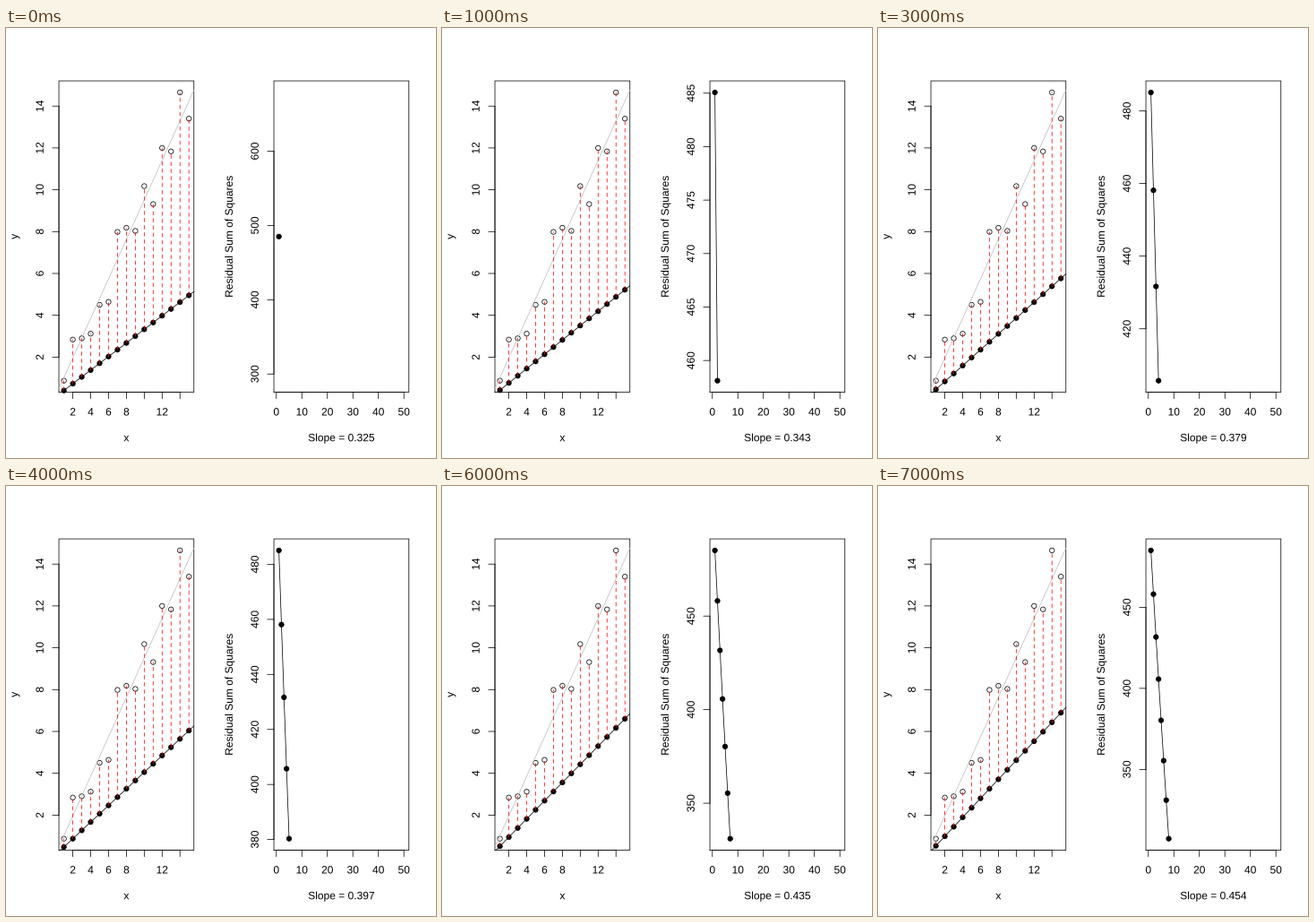
A matplotlib script for the animation above (8 s loop, 480 by 480 pixels).

```python
import math

import numpy as np
import matplotlib.pyplot as plt
from matplotlib.animation import FuncAnimation
from matplotlib.patches import Circle, PathPatch
from matplotlib.text import Text
from matplotlib.textpath import TextPath, text_to_path
from matplotlib.transforms import Affine2D

plt.rcParams.update({
    "font.family": "Liberation Sans",
    "font.size": 12,
    "lines.scale_dashes": False,
})

SIZE = 480
LINE = 14.4            # height of one margin line in pixels
TOP, BOTTOM = 4.1 * LINE, SIZE - 5.1 * LINE
THIN = 0.75
RADIUS = 2.7
STEPS = 50             # slopes in the full sweep
SHOWN = 8
FONT = Text().get_fontproperties()

x = np.arange(1, 16)
y = np.array([0.874, 2.84, 2.9, 3.12, 4.5, 4.642, 7.987, 8.184, 8.034,
              10.175, 9.315, 12.0, 11.835, 14.654, 13.4])
best, a = np.polyfit(x, y, 1)
slopes = np.tan(np.linspace(math.pi / 10, 3.5 * math.pi / 10, STEPS))
rss = [np.sum((y - a - b * x) ** 2) for b in slopes]
tick_steps = [100, 5, 10, 20, 20, 20, 50, 50]

fig = plt.figure(figsize=(SIZE / 72, SIZE / 72), dpi=72, facecolor="white")
ax = fig.add_axes([0, 0, 1, 1])


def stroke(xs, ys, color="black", **kw):
    ax.plot(xs, ys, color=color, lw=THIN, snap=False, zorder=1,
            solid_capstyle="round", **kw)


def label(px, py, text, angle=0):
    """Outlined text, so that it keeps its fractional position."""
    width = text_to_path.get_text_width_height_descent(text, FONT, False)[0]
    place = (Affine2D().translate(-width / 2, 0).rotate_deg(angle)
             .scale(1, -1).translate(px, py))
    path = TextPath((0, 0), text, prop=FONT).transformed(place)
    ax.add_patch(PathPatch(path, fc="black", lw=0, snap=False, zorder=1))


def padded(lo, hi):
    pad = 0.04 * (hi - lo)
    return lo - pad, hi + pad


class Panel:
    """A boxed plot region that maps data to stage pixels."""

    def __init__(self, left, xlim, ylim):
        self.left, self.right = left + 4.1 * LINE, left + 240 - 2.1 * LINE
        self.xlim, self.ylim = padded(*xlim), padded(*ylim)

    def px(self, v):
        lo, hi = self.xlim
        return self.left + (v - lo) / (hi - lo) * (self.right - self.left)

    def py(self, v):
        lo, hi = self.ylim
        return BOTTOM - (v - lo) / (hi - lo) * (BOTTOM - TOP)

    def line(self, slope, color):
        start = max(self.xlim[0], (self.ylim[0] - a) / slope)
        ends = np.array([start, self.xlim[1]])
        stroke(self.px(ends), self.py(a + slope * ends), color)

    def dots(self, xs, ys, fill):
        for u, v in zip(xs, ys):
            ax.add_patch(Circle((self.px(u), self.py(v)), RADIUS, fc=fill,
                                ec="black", lw=THIN, zorder=1))

    def frame(self, xticks, yticks, xlab, ylab, hidden=()):
        l, r, t, b = self.left, self.right, TOP, BOTTOM
        stroke([self.px(xticks[0]), self.px(xticks[-1])], [b, b])
        for v in xticks:
            p = self.px(v)
            stroke([p, p], [b, b + LINE / 2])
            if v not in hidden:
                label(p, b + 1.8 * LINE, str(v))
        stroke([l, l], [self.py(yticks[0]), self.py(yticks[-1])])
        for v in yticks:
            p = self.py(v)
            stroke([l, l - LINE / 2], [p, p])
            label(l - 1.2 * LINE, p, str(v), 90)
        stroke([l, r, r, l, l], [b, b, t, t, b], solid_joinstyle="round")
        label((l + r) / 2, b + 3.8 * LINE, xlab)
        label(l - 3.2 * LINE, (t + b) / 2, ylab, 90)


def draw_fit(slope):
    panel = Panel(0, (1, 15), (y.min(), y.max()))
    fitted = a + slope * x
    panel.dots(x, y, "none")
    panel.frame(range(2, 15, 2), range(2, 15, 2), "x", "y", hidden=(10, 14))
    panel.line(best, "#bebebe")
    panel.line(slope, "black")
    panel.dots(x, fitted, "black")
    for u, low, high in zip(x, fitted, y):
        stroke([panel.px(u)] * 2, [panel.py(low), panel.py(high)], "red",
               ls=(0, (4, 4)), dash_capstyle="round")


def draw_rss(i):
    seen = rss[:i + 1]
    lo, hi = min(seen), max(seen)
    if i == 0:
        lo, hi = 0.6 * lo, 1.4 * hi
    panel = Panel(240, (1, STEPS), (lo, hi))
    lo, hi = panel.ylim
    step = tick_steps[i]
    ticks = range(math.ceil(lo / step) * step, math.floor(hi) + 1, step)
    turns = np.arange(1, i + 2)
    stroke(panel.px(turns), panel.py(np.array(seen)))
    panel.dots(turns, seen, "black")
    panel.frame(range(0, 51, 10), ticks, f"Slope = {slopes[i]:.3f}",
                "Residual Sum of Squares")


def draw(i):
    ax.clear()
    ax.set_xlim(0, SIZE)
    ax.set_ylim(SIZE, 0)
    ax.axis("off")
    draw_fit(slopes[i])
    draw_rss(i)
    return []


anim = FuncAnimation(fig, draw, frames=SHOWN, interval=1000, repeat=True,
                     repeat_delay=0)
plt.show()
```
